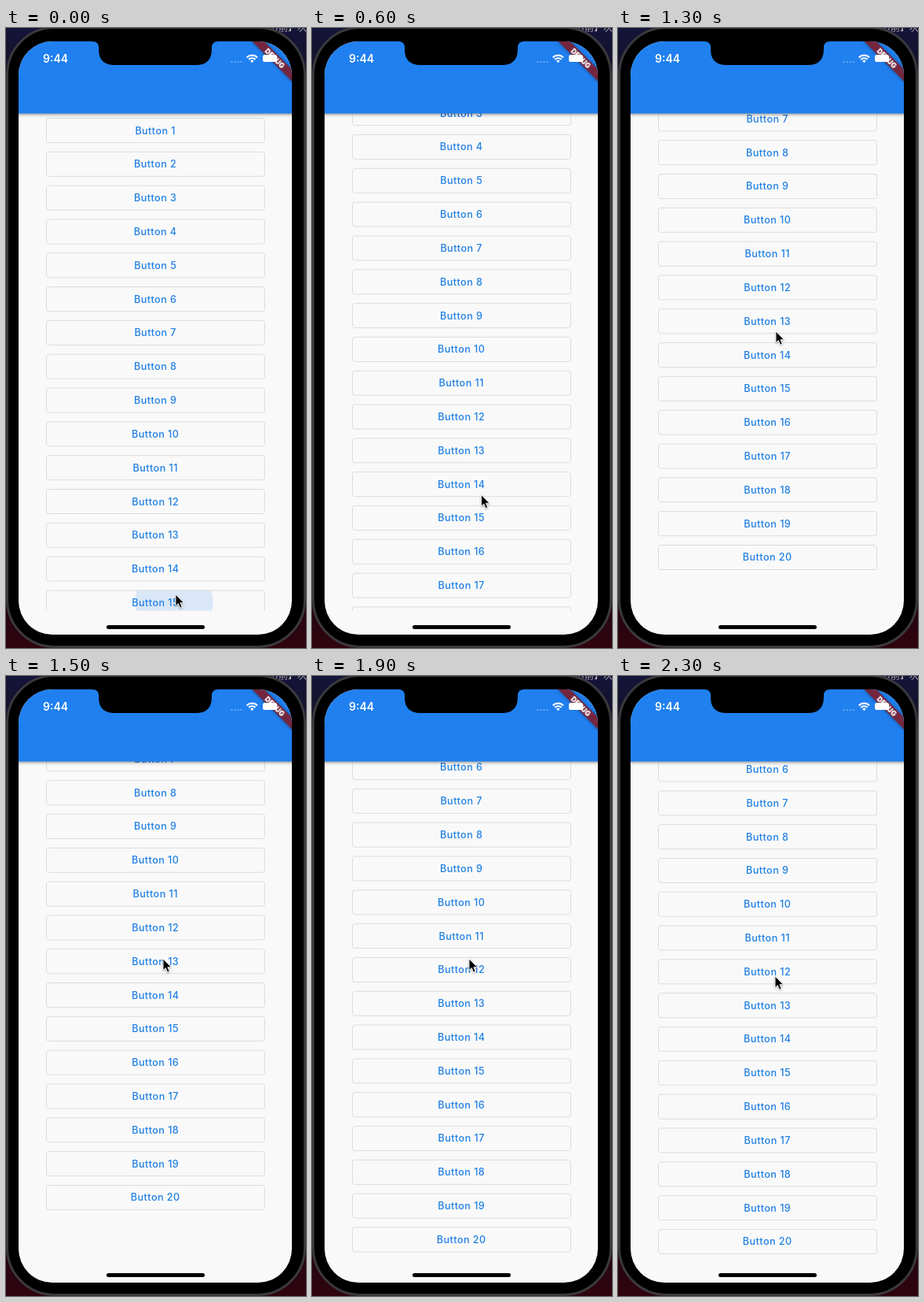
Recreate the animation shown at these times as an HTML page. Size 382 px wide and 787 px high, loop 2400 ms.

```html
<!DOCTYPE html>
<html lang="en">
<head>
<meta charset="utf-8">
<title>Bouncing button list</title>
<style>
  html, body { margin: 0; width: 100%; height: 100%; overflow: hidden; background: #000; }
  svg { display: block; width: 382px; height: 787px; font-family: Inter, Roboto, sans-serif; }
  .button rect { fill: none; stroke: #dcdcdc; }
  .button text { fill: #1f7fe3; font-size: 12.6px; font-weight: 500; letter-spacing: .45px; text-anchor: middle; }
  .bar { filter: drop-shadow(0 1.5px 2px #0007); }
  .banner { filter: drop-shadow(0 0 2px #0006); }
  #cursor { filter: drop-shadow(0 1px 1px #0005); }
</style>
</head>
<body>
<svg viewBox="0 0 382 787">
  <defs>
    <linearGradient id="desk" x2="0" y2="1">
      <stop stop-color="#15143a"/>
      <stop offset=".12" stop-color="#101018"/>
      <stop offset=".85" stop-color="#140710"/>
      <stop offset="1" stop-color="#30040f"/>
    </linearGradient>
    <clipPath id="screen"><rect x="16" y="17" width="348" height="753" rx="43"/></clipPath>
    <clipPath id="view"><rect x="16" y="108" width="348" height="631.5"/></clipPath>
    <clipPath id="pressed"><rect x="51" y="713.5" width="279" height="32" rx="3.5"/></clipPath>
  </defs>

  <rect width="382" height="787" fill="url(#desk)"/>
  <text x="335" y="3.5" font-size="12" fill="#aaa" font-family="'Noto Sans CJK JP', 'Noto Sans CJK', sans-serif">の前】次</text>
  <rect x="1.5" y="-.5" width="379" height="786" rx="60" stroke="#39393c" stroke-width="3"/>

  <g clip-path="url(#screen)">
    <rect width="382" height="787" fill="#f9f9f9"/>
    <g clip-path="url(#view)">
      <g id="ripple" clip-path="url(#pressed)"><circle cx="214" cy="729" r="49.5" fill="#2181f2" opacity=".15"/></g>
      <g id="list"></g>
    </g>
    <rect class="bar" x="10" y="10" width="360" height="98.5" fill="#2080ef"/>
    <g class="banner" transform="translate(364 17) rotate(45)">
      <rect x="-36" y="25" width="72" height="10.7" fill="#74263f"/>
      <text y="33.6" font-size="9" font-weight="900" fill="#fff" text-anchor="middle">DEBUG</text>
    </g>
    <g fill="#fff">
      <text x="47" y="44" font-size="14" font-weight="600">9:44</text>
      <g opacity=".4">
        <circle cx="287.5" cy="43" r="1.1"/><circle cx="291.5" cy="43" r="1.1"/>
        <circle cx="295.5" cy="43" r="1.1"/><circle cx="299.5" cy="43" r="1.1"/>
      </g>
      <g fill="none" stroke="#fff" stroke-width="2.1">
        <path d="M306.7 37.4a9.5 9.5 0 0 1 13.4 0M309.2 40a6 6 0 0 1 8.4 0"/>
      </g>
      <path d="M313.4 44.2l-2.3-2.4a3.3 3.3 0 0 1 4.6 0z"/>
      <rect x="327" y="34" width="18" height="9" rx="2.5"/>
    </g>
    <path d="M110 17q8 0 8 8v2q0 20 20 20h104q20 0 20-20v-2q0-8 8-8v-3h-160z"/>
    <rect x="128" y="758" width="125" height="5" rx="2.5"/>
  </g>
  <path id="cursor" d="M0 0v14.6l3.3-3 2.3 5.5 2.6-1.1-2.3-5.3h4.6z" stroke="#fff" stroke-width=".9"/>
</svg>
<script>
const LOOP = 2400, STEP = 100, PITCH = 42.82, END = 225.6, RELEASE = 1500;
const [list, ripple, cursor] = ['list', 'ripple', 'cursor'].map(id => document.getElementById(id));

for (let n = 1; n <= 20; n++) {
  const y = 130 + PITCH * (n - 1);
  list.innerHTML += `<g class="button"><rect x="51.5" y="${y - 15.5}" width="278" height="31" rx="3"/>
    <text x="190.2" y="${y + 4.5}">Button ${n}</text></g>`;
}

// Keys are [time, value...], joined by straight lines.
function track(keys, t) {
  const i = keys.findIndex(k => k[0] > t);
  if (i < 0) return keys.at(-1).slice(1);
  const a = keys[i - 1], b = keys[i], p = (t - a[0]) / (b[0] - a[0]);
  return a.slice(1).map((v, j) => v + (b[j + 1] - v) * p);
}

const drag = [[0, 0], [100, 98], [399, 98], [400, 100], [500, 100], [700, 115], [1000, 201.8],
  [1060, END], [1300, 271.6], [1400, 278.5], [RELEASE, 281.6]];
const pointer = [[0, 216, 719], [100, 216, 597], [399, 216, 597], [400, 216, 595], [500, 216, 595],
  [700, 215, 590], [1000, 210, 508], [1300, 201, 385], [1400, 200, 366], [RELEASE, 200, 359],
  [1900, 200, 359], [2300, 200, 381]];

// Overdamped spring pulls the overscroll back to the end of the list.
function scroll(t) {
  if (t <= RELEASE) return track(drag, t)[0];
  const s = (t - RELEASE) / 1000;
  return END + 56 * (1.7 * Math.exp(-9.08 * s) - .7 * Math.exp(-22 * s));
}

function draw(now) {
  const t = Math.floor(now % LOOP / STEP) * STEP;
  list.setAttribute('transform', `translate(0 ${-scroll(t)})`);
  cursor.setAttribute('transform', `translate(${track(pointer, t)})`);
  ripple.style.display = t ? 'none' : '';
  requestAnimationFrame(draw);
}
draw(performance.now());
</script>
</body>
</html>
```
